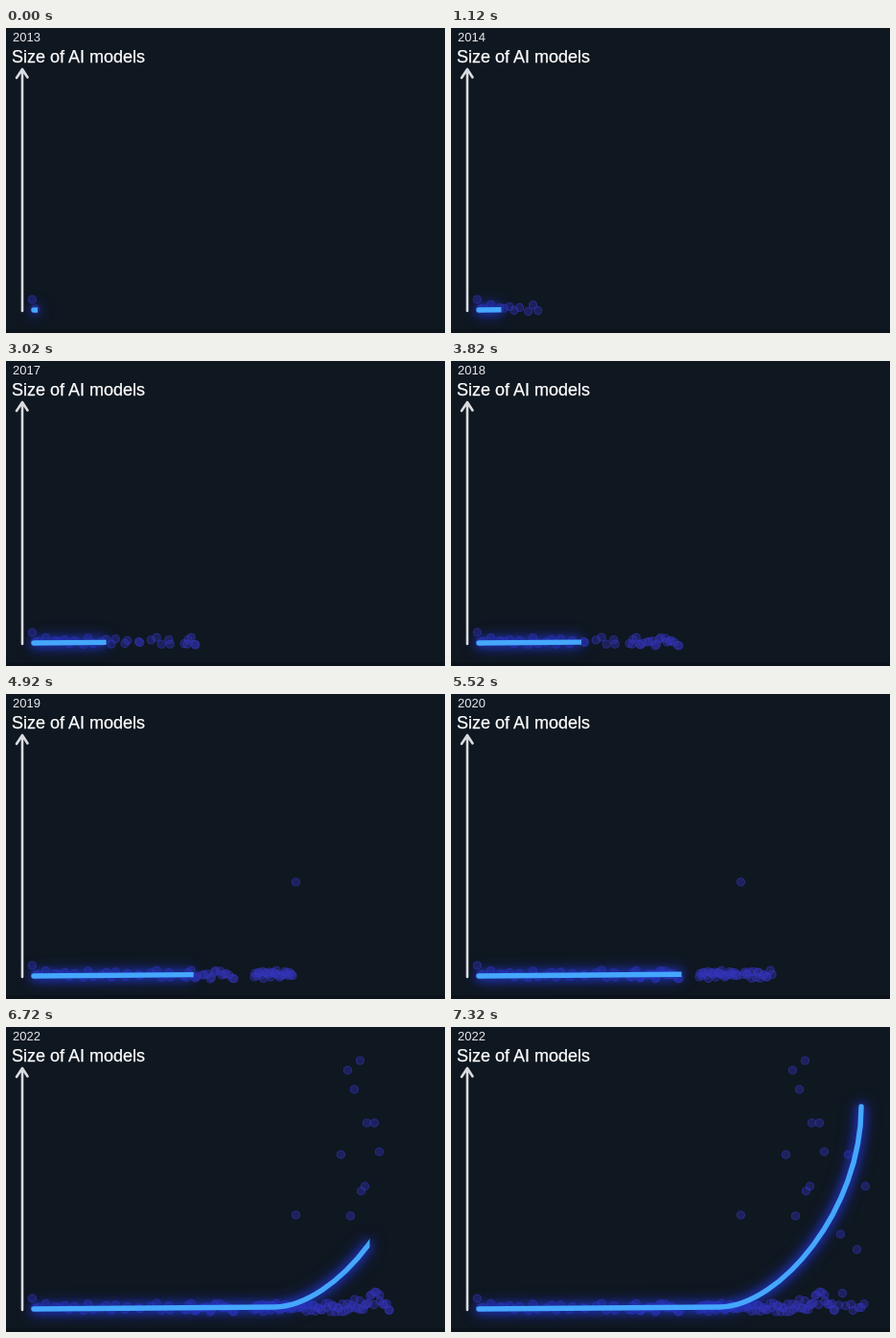
Animation, 458 px wide and 318 px high, one loop 7.42 s. Source, as an HTML page:

```html
<!DOCTYPE html>
<html lang="en">
<head>
<meta charset="utf-8">
<title>Size of AI models</title>
<style>
  html, body { margin: 0; height: 100%; overflow: hidden; background: #0f1720; }
  svg { display: block; width: 100vw; height: 100vh; }
  text { font-family: "Liberation Sans", Arial, sans-serif; }
  #dots { fill: #3232b4; fill-opacity: .4; stroke: #3a3ac4; stroke-opacity: .55; }
  .glow { filter: drop-shadow(0 0 5px #2038c8) drop-shadow(0 0 7px #2030c0); }
  .line { fill: none; stroke-linecap: round; stroke-linejoin: round; }
</style>
</head>
<body>
<svg viewBox="0 0 458 318">
  <defs>
    <clipPath id="wipe"><rect id="wipeRect" width="0" height="318"/></clipPath>
  </defs>
  <rect width="458" height="318" fill="#0f1720"/>
  <rect y="314" width="458" height="4" fill="#0c131b"/>
  <g id="dots"></g>
  <g class="glow">
    <g clip-path="url(#wipe)">
      <path class="line" stroke="#45a7fc" stroke-width="5.4"
        d="M29 294L280 292C344 291 428 190 428 83"/>
    </g>
  </g>
  <path class="line" stroke="#d9dbde" stroke-width="2.6" d="M17 295V43M11 52L17 43L22.5 51.5"/>
  <text id="year" x="7" y="14" font-size="13" fill="#e6e9ec"></text>
  <text x="6" y="36" font-size="18" fill="#fff" stroke="#fff" stroke-width=".25">Size of AI models</text>
</svg>
<script>
const LOOP = 7420, STEP = 100, LEAD = 20;
const byId = id => document.getElementById(id);

let seed = 11;
const random = () => (seed = seed * 16807 % 2147483647) / 2147483647;

function addDot(x, y) {
  const node = document.createElementNS("http://www.w3.org/2000/svg", "circle");
  node.setAttribute("cx", x + .4);
  node.setAttribute("cy", y);
  node.setAttribute("r", 4.1);
  byId("dots").append(node);
  return { x, node };
}

// Spreads dots evenly with jitter; the latest ones sometimes rise off the baseline
function addBand(from, to, count) {
  return Array.from({ length: count }, (_, i) => {
    const x = from + (i + random()) * (to - from) / count;
    const lift = x > 362 ? 18 * random() ** 3 : 0;
    return addDot(x, 292.5 + (random() - .5) * 9 - lift);
  });
}

// The two first models and the few that stand far above the baseline
const keyPoints = [
  [27, 283], [30, 293], [302, 196], [349, 133], [356, 45], [359, 197],
  [363, 65], [369, 35], [370, 171], [374, 166], [376, 100], [384, 100],
  [389, 130], [406, 216], [414, 133], [423, 232], [432, 166]
];

const dots = [
  ...addBand(33, 176, 23),
  ...addBand(183, 240, 21),
  ...addBand(257, 300, 28),
  ...addBand(303, 401, 52),
  ...addBand(403, 434, 8),
  ...keyPoints.map(([x, y]) => addDot(x, y))
];

function draw(ms) {
  const t = ms < LEAD ? 0 : LEAD + Math.floor((ms - LEAD) / STEP) * STEP;
  const front = 31.5 + .055 * t;
  for (const { x, node } of dots) node.style.display = x <= front ? "" : "none";

  const s = t / 1000;
  const edge = t > 7050 ? 458 : Math.max(33, 31 + s / (.0588 - .00588 * s));
  byId("wipeRect").setAttribute("width", edge);
  byId("year").textContent = Math.floor(2013.35 + .0013 * t);
}

function tick() {
  draw(performance.now() % LOOP);
  requestAnimationFrame(tick);
}
tick();
</script>
</body>
</html>
```
